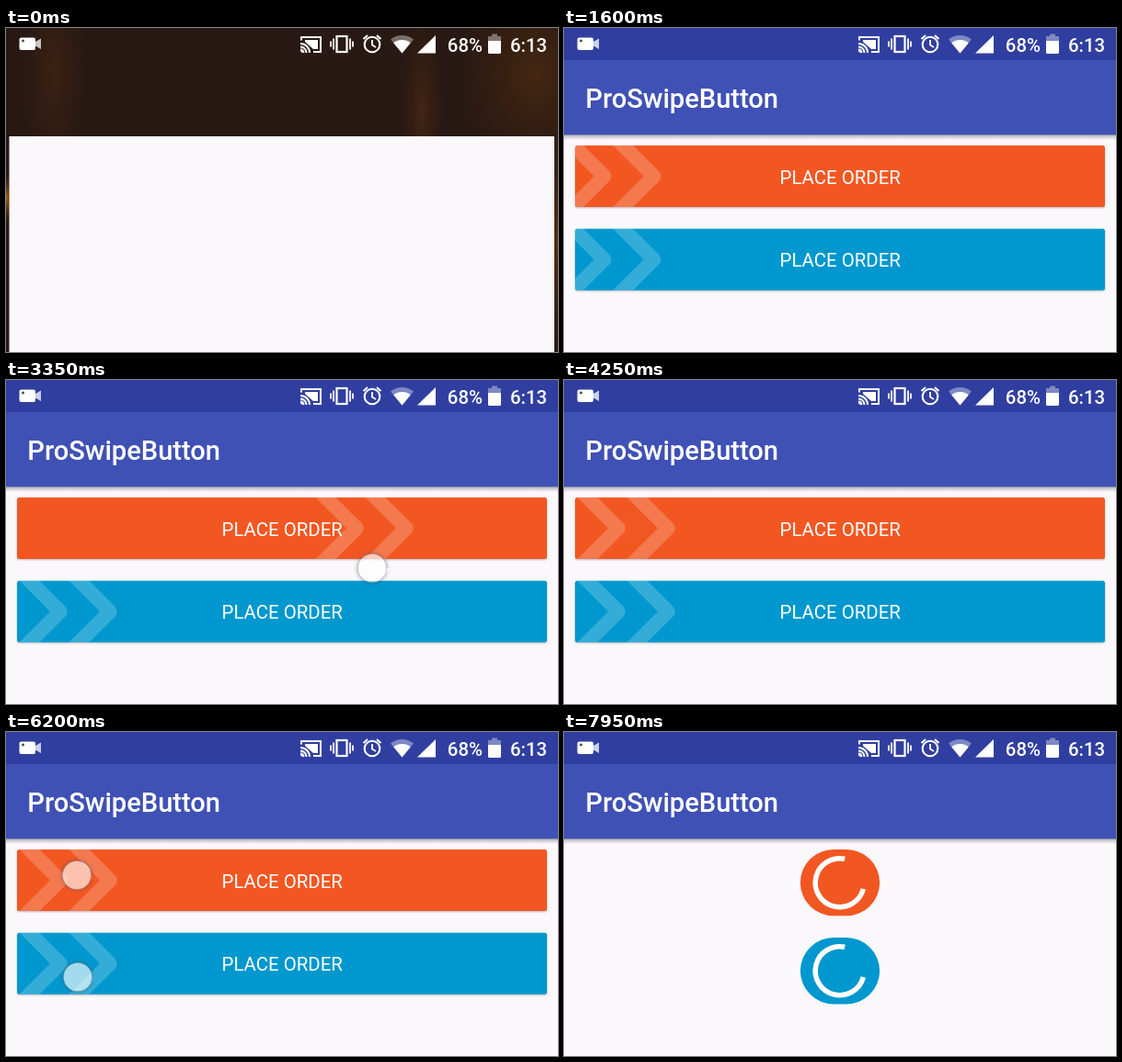
These frames come from a looping animation (600 by 353 pixels, 8000 ms). An HTML page with a canvas:

```html
<!DOCTYPE html>
<html lang="en">
<head>
<meta charset="utf-8">
<title>ProSwipeButton</title>
<style>
  html, body { margin: 0; width: 100%; height: 100%; overflow: hidden; background: #faf8fb; }
  canvas { display: block; }
</style>
</head>
<body>
<canvas id="stage" width="600" height="353"></canvas>
<script>
const ctx = document.getElementById('stage').getContext('2d');
const LOOP = 8000, APP_READY = 180, MORPH_START = 7485;
const WIDTH = 576, HINT_WIDTH = 125, GRIP = 76;

const clamp = v => Math.max(0, Math.min(1, v));
const span = (t, start, duration) => clamp((t - start) / duration);
const ease = u => (1 - Math.cos(Math.PI * u)) / 2;
const mix = (a, b, u) => a + (b - a) * u;

function rect(x, y, w, h, color) {
  ctx.fillStyle = color;
  ctx.fillRect(x, y, w, h);
}

function shape(points, color) {
  ctx.beginPath();
  points.forEach(([x, y]) => ctx.lineTo(x, y));
  ctx.closePath();
  ctx.fillStyle = color;
  ctx.fill();
}

function line(points, width, color = '#fff') {
  ctx.beginPath();
  points.forEach(([x, y]) => ctx.lineTo(x, y));
  ctx.lineWidth = width;
  ctx.strokeStyle = color;
  ctx.stroke();
}

function arc(x, y, r, from, to, width, color = '#fff') {
  ctx.beginPath();
  ctx.arc(x, y, r, from, to);
  ctx.lineWidth = width;
  ctx.strokeStyle = color;
  ctx.stroke();
}

function roundRect(x, y, w, h, r, color) {
  ctx.beginPath();
  ctx.roundRect(x, y, w, h, r);
  ctx.fillStyle = color;
  ctx.fill();
}

function label(text, x, y, size, weight, align = 'left') {
  ctx.font = `${weight} ${size}px Roboto, sans-serif`;
  ctx.textAlign = align;
  ctx.fillStyle = '#fff';
  ctx.fillText(text, x, y);
}

function glow(x, y, rx, ry, color) {
  ctx.save();
  ctx.translate(x, y);
  ctx.scale(rx, ry);
  const g = ctx.createRadialGradient(0, 0, 0, 0, 0, 1);
  g.addColorStop(0, color);
  g.addColorStop(1, 'rgba(70,35,10,0)');
  rect(-1, -1, 2, 2, g);
  ctx.restore();
}

function wallpaper() {
  rect(0, 0, 600, 353, '#281914');
  glow(52, 45, 34, 130, 'rgba(80,42,18,.5)');
  glow(452, 90, 24, 110, 'rgba(95,50,18,.5)');
  glow(575, 50, 85, 120, 'rgba(80,46,16,.7)');
  glow(0, 185, 8, 30, 'rgba(205,125,25,.9)');
  glow(600, 230, 10, 150, 'rgba(110,62,18,.8)');
}

function statusIcons() {
  const dim = 'rgba(255,255,255,.38)';
  // camera
  roundRect(14.5, 10.5, 17.5, 13.5, 2, '#fff');
  shape([[32, 15], [38, 11.5], [38, 23], [32, 19.5]], 'rgba(255,255,255,.75)');
  ctx.beginPath();
  ctx.arc(18.5, 14, 1.4, 0, 7);
  ctx.fillStyle = '#444';
  ctx.fill();
  // cast
  line([[321, 13.5], [321, 10], [342, 10], [342, 26], [334, 26]], 2);
  shape([[325, 13], [339, 13], [339, 23], [334, 23], [325, 15]], '#fff');
  for (const r of [3, 6.5, 10]) arc(320, 27, r, -Math.PI / 2, 0, r === 3 ? 3 : 2);
  // vibrate
  ctx.lineWidth = 2.2;
  ctx.strokeStyle = '#fff';
  ctx.strokeRect(359.5, 9, 11, 17);
  for (const [x, h] of [[353, 3], [356, 6], [374, 6], [377, 3]])
    line([[x, 17.5 - h], [x, 17.5 + h]], 1.8);
  // alarm
  arc(398, 18, 8.3, 0, 7, 2.1);
  line([[398, 13], [398, 18.5], [402, 21]], 1.8);
  line([[388.5, 12], [393, 8]], 2.1);
  line([[407.5, 12], [403, 8]], 2.1);
  // wifi
  const fan = (r, color) => {
    ctx.beginPath();
    ctx.moveTo(430.5, 27.5);
    ctx.arc(430.5, 27.5, r, -Math.PI * .72, -Math.PI * .28);
    ctx.fillStyle = color;
    ctx.fill();
  };
  fan(19.5, dim);
  fan(14.5, '#fff');
  // signal and battery
  shape([[467, 8], [467, 27.5], [447, 27.5]], '#fff');
  rect(528, 6.5, 6, 2.5, dim);
  rect(524, 9, 14, 5, dim);
  roundRect(524, 14, 14, 14, [0, 0, 1.5, 1.5], '#fff');
  label('68%', 479.8, 25.5, 20.4, 500);
  label('6:13', 548, 25.5, 20.4, 500);
}

function chevrons(offset, top, height, opacity) {
  const mid = top + height / 2;
  ctx.lineJoin = 'round';
  for (const tip of [59, 113]) {
    const x = tip + offset;
    line([[x - 50, mid - 50], [x, mid], [x - 50, mid + 50]], 15.5, `rgba(255,255,255,${.2 * opacity})`);
  }
  ctx.lineJoin = 'miter';
}

// Hint leaves on the right, then re-enters from the left.
function hintRun(t, start) {
  return t < start + 1000
    ? WIDTH * ease(span(t, start, 1000))
    : -HINT_WIDTH * (1 - ease(span(t, start + 1000, 500)));
}

const firstDrag = t => 322 * ease(span(t, 2400, 800));
const finalDrag = (t, reach) => reach * ease(span(t, 6550, 750));

function hintOffset(t, isFirst, reach) {
  if (t < 2300) return hintRun(t, 215);
  if (t >= 6000) return finalDrag(t, reach);
  if (!isFirst) return 0;
  if (t < 4250) return firstDrag(t) * (1 - ease(span(t, 3400, 200)));
  return hintRun(t, 4400);
}

function spinner(x, y, elapsed) {
  const start = -Math.PI / 2 + 2 * Math.PI * (elapsed / 2222 + elapsed / 1333 * .25);
  const sweep = 1.5 * Math.PI * (1 - (1 - clamp(elapsed / 666)) ** 4);
  arc(x, y, 26.5, start, start + sweep, 5.5);
}

function button(t, baseTop, color, isFirst, reach) {
  const morph = ease(span(t, MORPH_START, 520));
  const width = mix(WIDTH, 73, morph), height = mix(67, 72.5, morph);
  const top = baseTop + (isFirst ? 0 : 5.5 * morph);
  const x = 300 - width / 2;
  const visible = 1 - span(t, MORPH_START, 200);

  ctx.save();
  ctx.shadowColor = `rgba(0,0,0,${.25 * (1 - morph)})`;
  ctx.shadowBlur = 2;
  ctx.shadowOffsetY = 1;
  roundRect(x, top, width, height, Math.min(height / 2, 2.5 + 70 * morph), color);
  ctx.restore();

  if (visible > 0) {
    ctx.save();
    ctx.clip();
    chevrons(hintOffset(t, isFirst, reach), top, height, visible);
    ctx.globalAlpha = visible;
    label('PLACE ORDER', 300.2, top + height / 2 + 8.2, 20.4, 400, 'center');
    ctx.restore();
  }
  if (t > MORPH_START) spinner(299.7, top + height / 2, t - MORPH_START - 10);
}

function touch(t, from, to, x, y) {
  const opacity = span(t, from, 60) * (1 - span(t, to, 60));
  if (!opacity) return;
  ctx.save();
  ctx.globalAlpha = opacity;
  const halo = ctx.createRadialGradient(x, y, 14, x, y, 20);
  halo.addColorStop(0, 'rgba(70,75,95,.3)');
  halo.addColorStop(1, 'rgba(70,75,95,0)');
  ctx.beginPath();
  ctx.arc(x, y, 20, 0, 7);
  ctx.arc(x, y, 15.5, 0, 7, true);
  ctx.fillStyle = halo;
  ctx.fill('evenodd');
  ctx.beginPath();
  ctx.arc(x, y, 15.5, 0, 7);
  ctx.fillStyle = 'rgba(255,255,255,.64)';
  ctx.fill();
  arc(x, y, 15.8, 0, 7, 1, 'rgba(120,125,140,.4)');
  ctx.restore();
}

function launch(t) {
  const rise = 1 - (1 - span(t, 50, 110)) ** 2;
  wallpaper();
  rect(mix(3.5, 0, rise), mix(118, 0, rise), mix(592.5, 600, rise), 353, '#faf8fb');
  ctx.globalAlpha = span(t, 50, 100);
  rect(0, 0, 600, 35, '#303f9f');
  ctx.globalAlpha = 1;
}

function app(t) {
  rect(0, 0, 600, 353, '#faf8fb');
  const shade = ctx.createLinearGradient(0, 116, 0, 122);
  shade.addColorStop(0, 'rgba(0,0,0,.3)');
  shade.addColorStop(1, 'rgba(0,0,0,0)');
  rect(0, 116, 600, 6, shade);
  rect(0, 35, 600, 81.4, '#3f51b5');
  rect(0, 0, 600, 35, '#303f9f');
  label('ProSwipeButton', 23.3, 87.4, 29.1, 500);
  button(t, 128, '#f25722', true, 448);
  button(t, 218.7, '#0098ce', false, 426);

  touch(t, 2300, 3400, GRIP + firstDrag(t), mix(188, 205, ease(span(t, 2400, 800))));
  touch(t, 4250, 4400, 78, 160);
  const slide = ease(span(t, 6550, 750));
  touch(t, 6000, 7460, GRIP + 1 + finalDrag(t, 447), 156 + 7 * slide);
  touch(t, 6000, 7460, GRIP + 2 + finalDrag(t, 423), 267 + 8 * slide);
}

function frame() {
  const t = performance.now() % LOOP;
  ctx.clearRect(0, 0, 600, 353);
  if (t < APP_READY) launch(t);
  else app(t);
  statusIcons();
  requestAnimationFrame(frame);
}
frame();
</script>
</body>
</html>
```
